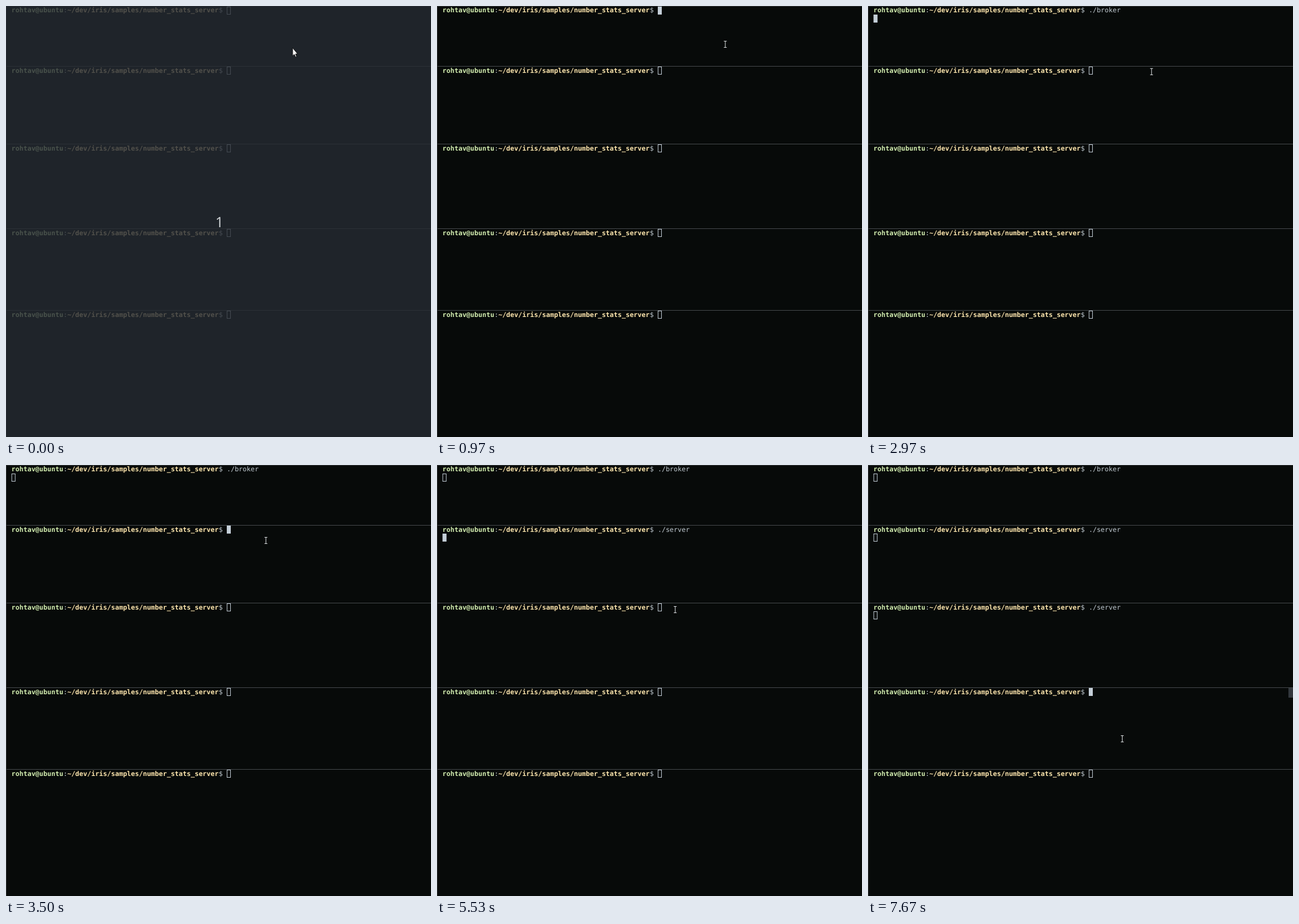
These frames come from a looping animation (743x754 px, 8000 ms). An HTML page:

```html
<!DOCTYPE html>
<html lang="en">
<head>
<meta charset="utf-8">
<title>Terminal panes</title>
<style>
  html, body { margin: 0; width: 100%; height: 100%; overflow: hidden; background: #070a09; }
  svg { display: block; }
  text { font: 11.577px "DejaVu Sans Mono", monospace; fill: #c1cad1; text-rendering: geometricPrecision; white-space: pre; }
  .user { font-weight: bold; fill: #d3eeb0; }
  .path { font-weight: bold; fill: #ffe7ae; }
  .count { font: 25px "Open Sans", sans-serif; fill: #d3d7da; }
  .caret { stroke: #c5d0d9; }
</style>
</head>
<body>
<svg id="stage" width="743" height="754" viewBox="0 0 743 754">
  <rect width="743" height="754" fill="#070a09"/>
  <g id="panes"></g>
  <rect width="1" height="754" fill="#303437"/>
  <rect id="scrollbar" x="735" y="390" width="8" height="17" fill="#32373d"/>
  <g id="beam" fill="none">
    <path d="M-2.5 -5.5H2.5M0 -5.5V5.5M-2.5 5.5H2.5" stroke="#070a09" stroke-width="3"/>
    <path d="M-2.5 -5.5H2.5M0 -5.5V5.5M-2.5 5.5H2.5" stroke="#dfe3e5"/>
  </g>
  <g id="intro">
    <rect width="743" height="754" fill="#262b32" opacity=".8"/>
    <text class="count" x="366" y="387">1</text>
    <path d="M501 73V87.5L504 84.7L506.2 89.4L508.2 88.5L506.1 84H510Z" fill="#f4f4f4" stroke="#0a0b0c"/>
  </g>
</svg>
<script>
const LOOP = 8000, INTRO_END = 30, CELL = 6.97, LEFT = 9.6, ROW = 14, PROMPT = 54, MOVE_STEP = 70;
const byId = id => document.getElementById(id);
const colX = col => LEFT + col * CELL;
const show = (id, visible) => byId(id).setAttribute('visibility', visible ? 'visible' : 'hidden');

function add(parent, tag, attrs, content = '') {
  const node = document.createElementNS('http://www.w3.org/2000/svg', tag);
  for (const key in attrs) node.setAttribute(key, attrs[key]);
  node.textContent = content;
  return parent.appendChild(node);
}

// Each burst: start time, gap between keys, keys. Completion arrives with no gap.
const panes = [
  { top: 0, focus: 430, bursts: [[1300, 70, './'], [1770, 0, 'br'], [2270, 0, 'oker\n']] },
  { top: 105.6, focus: 3500, bursts: [[3730, 0, '.'], [3870, 87, '/ser'], [4270, 0, 'ver '], [4500, 0, '\n']] },
  { top: 241.6, focus: 5730, bursts: [[6030, 85, './ser'], [6500, 0, 'ver '], [6600, 0, '\n']] },
  { top: 389.6, focus: 7530, bursts: [] },
  { top: 532.6, focus: 400, bursts: [] }
];

// Pointer moves; dip bends the path downwards past its end.
const home = { x: 502.2, y: 75 };
const moves = [
  { start: 870, steps: 2, x: 504, y: 67, dip: 0 },
  { start: 2970, steps: 6, x: 454.4, y: 132, dip: 74 },
  { start: 5100, steps: 6, x: 416.4, y: 253, dip: 82 },
  { start: 7130, steps: 7, x: 444.5, y: 481, dip: 140 },
  { start: 7670, steps: 1, x: 444.5, y: 479, dip: 0 }
];

for (const pane of panes) {
  const line = Math.floor(pane.top);
  const group = add(byId('panes'), 'g', {});
  const run = (col, content, cls = '') =>
    add(group, 'text', { x: colX(col), y: pane.top + 11, class: cls }, content);
  add(group, 'rect', { y: line, width: 743, height: 1, fill: line ? '#464a4d' : '#303437' });
  run(0, 'rohtav@ubuntu', 'user');
  run(13, ':');
  run(14, '~/dev/iris/samples/number_stats_server', 'path');
  run(52, '$');
  pane.command = run(PROMPT, '');
  pane.caret = add(group, 'rect', { class: 'caret', width: 6, height: 13 });
}

function typedAt(bursts, t) {
  return bursts.map(([start, gap, keys]) =>
    [...keys].filter((_, i) => t >= start + i * gap).join('')).join('');
}

function pointerAt(t) {
  let from = home;
  for (const move of moves) {
    if (t < move.start) break;
    const p = Math.min(1, (Math.floor((t - move.start) / MOVE_STEP) + 1) / move.steps);
    if (p < 1) return {
      x: from.x + (move.x - from.x) * p,
      y: from.y + (move.y - from.y) * p + move.dip * Math.sin(Math.PI * p)
    };
    from = move;
  }
  return from;
}

function draw(t) {
  const active = panes.filter(pane => pane.focus <= t).sort((a, b) => b.focus - a.focus)[0];
  for (const pane of panes) {
    const typed = typedAt(pane.bursts, t);
    const entered = typed.endsWith('\n');
    pane.command.textContent = typed.trimEnd();
    pane.caret.setAttribute('x', colX(entered ? 0 : PROMPT + typed.length) + .5);
    pane.caret.setAttribute('y', Math.floor(pane.top) + 1.5 + (entered ? ROW : 0));
    pane.caret.setAttribute('fill', pane === active ? '#c5d0d9' : 'none');
  }
  const { x, y } = pointerAt(t);
  byId('beam').setAttribute('transform', `translate(${x} ${y})`);
  show('beam', t >= INTRO_END);
  show('intro', t < INTRO_END);
  show('scrollbar', t >= panes[3].focus);
}

let start;
function tick(now) {
  start ??= now;
  draw((now - start) % LOOP);
  requestAnimationFrame(tick);
}
draw(0);
requestAnimationFrame(tick);
</script>
</body>
</html>
```
